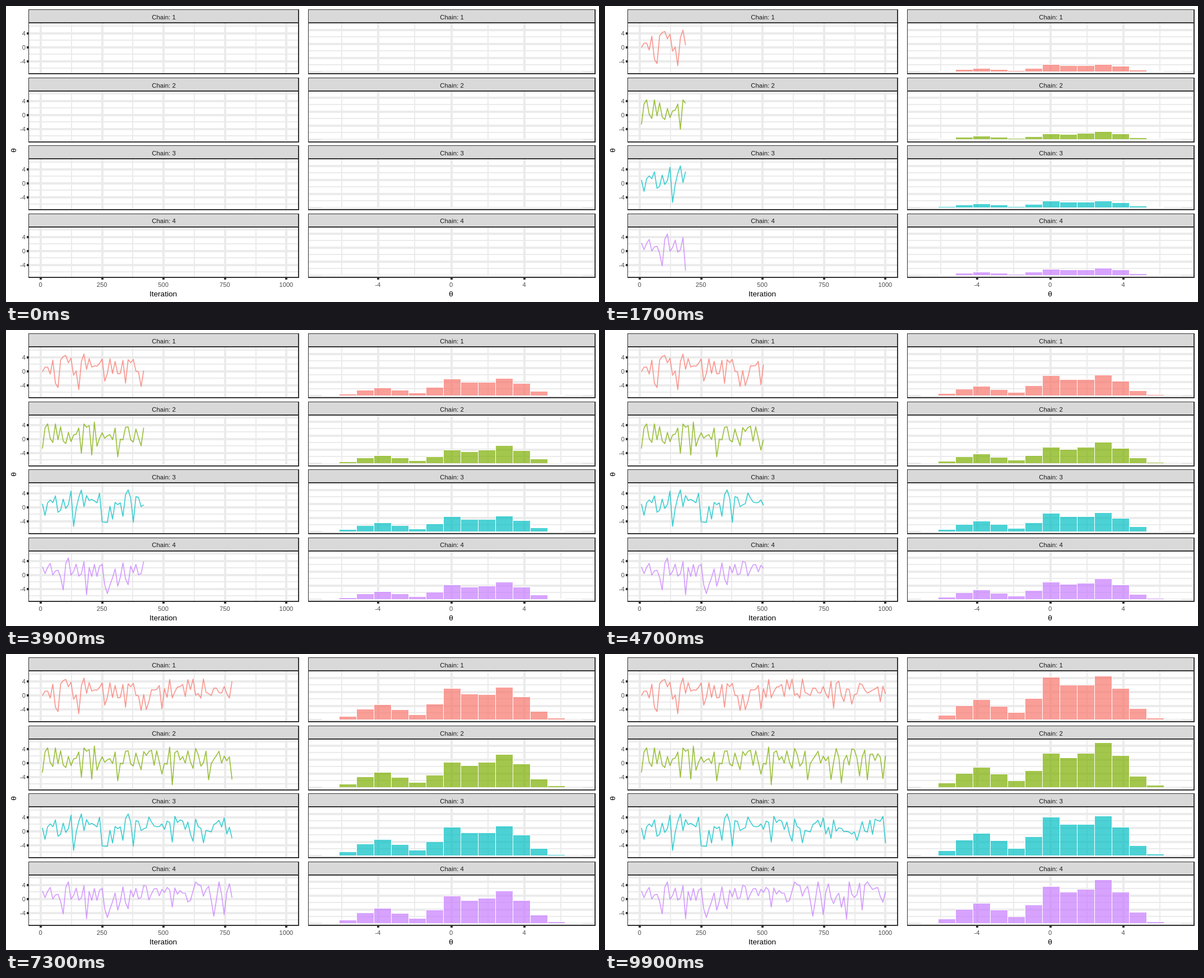
An HTML page with a canvas for the animation above (10 s loop, 1058x529 px).

```html
<!DOCTYPE html>
<html lang="en">
<head>
<meta charset="utf-8">
<title>Trace plots and histograms</title>
<style>
html, body { margin: 0; width: 100%; height: 100%; overflow: hidden; background: #fff; }
canvas { display: block; }
</style>
</head>
<body>
<canvas id="stage" width="1058" height="529"></canvas>
<script>
const ctx = document.getElementById('stage').getContext('2d');
const INK = '#333333', GRID = '#ebebeb', AXIS = '#4d4d4d';
const FRAME_MS = 100, FRAMES = 100, LAST_DRAW = 94;
const ROW = 121.4;                    // vertical distance between panels
const BINS = 15, BIN_WIDTH = 31, BINS_LEFT = 563;
const thetaX = theta => 794.5 + 32.65 * theta;
const iterationX = n => 62 + .4384 * n;

// The sampled distribution: three bell curves, the low one visited in dips
const MODES = [{ mean: -3.8, width: 1.54 }, { mean: .1, width: 1.22 }, { mean: 2.9, width: 1.6 }];

// peaks: final bar height in pixels at each mode; dips: draws that visit the low mode
const chains = [
  { color: '#F8766D', peaks: [36, 73, 78], dips: [5, 6, 14, 24, 32, 38, 40, 46, 74, 78, 81, 92] },
  { color: '#7CAE00', peaks: [36, 58, 80], dips: [0, 15, 19, 21, 29, 38, 46, 50, 64, 73, 77, 84, 87, 93] },
  { color: '#00BFC4', peaks: [40, 66, 71], dips: [1, 12, 23, 24, 25, 27, 31, 35, 50, 58, 62, 83, 94] },
  { color: '#C77CFF', peaks: [36, 63, 78], dips: [8, 17, 24, 25, 26, 29, 33, 50, 66, 70, 77, 79, 85] },
];

function seeded(seed) {
  return () => {
    seed = (Math.imul(seed, 1664525) + 1013904223) >>> 0;
    return seed / 2 ** 32;
  };
}

function sampleTrace(dips, seed) {
  const random = seeded(seed);
  const normal = () => 2 * (random() + random() + random() - 1.5);
  return Array.from({ length: LAST_DRAW + 1 }, (_, i) => {
    const upper = random() < .4 ? 1 : 2;
    const { mean, width } = MODES[dips.includes(i) ? 0 : upper];
    return Math.min(4.9, mean + normal() * width / Math.SQRT2);
  });
}

function barHeight(peaks, bin) {
  const theta = (BINS_LEFT + BIN_WIDTH * (bin + .5) - thetaX(0)) / 32.65;
  return MODES.reduce((sum, { mean, width }, m) =>
    sum + peaks[m] * Math.exp(-(((theta - mean) / width) ** 2)), 0);
}

chains.forEach((chain, i) => {
  chain.top = ROW * i;
  chain.trace = sampleTrace(chain.dips, 7919 * (i + 1));
  chain.bars = Array.from({ length: BINS }, (_, bin) => barHeight(chain.peaks, bin));
});

function box(color, x, y, w, h) {
  ctx.fillStyle = color;
  ctx.fillRect(Math.round(x), Math.round(y), w, h);
}

function label(text, x, y, size, color, align = 'center') {
  ctx.font = size + 'px "Liberation Sans", Arial, sans-serif';
  ctx.fillStyle = color;
  ctx.textAlign = align;
  ctx.fillText(text, x, Math.round(y));
}

// Evenly spaced grid lines inside one panel
function grid(x, w, top, size, firstX, stepX, firstY) {
  for (let gx = firstX; gx < x + w; gx += stepX) box(GRID, gx - size / 2, top + 31, size, 89);
  for (let gy = firstY; gy < 120; gy += 25) box(GRID, x, top + gy - size / 2, w, size);
}

function border(x, w, top, title) {
  box('#d9d9d9', x, top + 6.4, w, 23);
  box(INK, x, top + 6.4, w, 1);
  box(INK, x, top + 6.4, 1, 115);
  box(INK, x, top + 29.3, w, 2);
  box(INK, x, top + 120.2, w, 2);
  box(INK, x + w - 2, top + 6.4, 2, 115);
  label(title, x + w / 2, top + 24.2, 11.4, '#1a1a1a');
}

function drawTrace({ color, trace, top }, step) {
  if (!step) return;
  ctx.globalAlpha = .75;
  ctx.strokeStyle = color;
  ctx.lineWidth = 1.7;
  ctx.lineJoin = 'round';
  ctx.beginPath();
  trace.slice(0, step + 1).forEach((v, i) => ctx.lineTo(65 + 4.633 * i, top + 73.7 - 6.25 * v));
  ctx.stroke();
  ctx.globalAlpha = 1;
}

function drawBars({ color, bars, top }, step) {
  const base = Math.round(top + 117) + .5;
  ctx.strokeStyle = '#fff';
  ctx.lineWidth = 1;
  bars.forEach((full, i) => {
    const h = Math.round(full * step / (FRAMES - 1));
    const x = BINS_LEFT + BIN_WIDTH * i + .5;
    ctx.globalAlpha = .7;
    ctx.fillStyle = color;
    ctx.fillRect(x, base - h, BIN_WIDTH, h);
    ctx.globalAlpha = 1;
    ctx.strokeRect(x, base - h, BIN_WIDTH, h);
  });
}

function tickBelow(text, x) {
  box(INK, x - 2, 486, 4, 3);
  label(text, x - .5, 502, 11.2, AXIS);
}

function drawAxes() {
  for (let n = 0; n <= 1000; n += 250) tickBelow(n, iterationX(n));
  for (let n = -4; n <= 4; n += 4) tickBelow(n, thetaX(n));
  label('Iteration', 280.5, 519, 13.6, '#000');
  label('θ', 794, 519, 13.6, '#000');
  ctx.save();
  ctx.translate(18, 258);
  ctx.rotate(-Math.PI / 2);
  label('θ', 0, 0, 13.6, '#000');
  ctx.restore();
}

function draw(step) {
  box('#fff', 0, 0, 1058, 529);
  chains.forEach((chain, i) => {
    const { top } = chain, title = 'Chain: ' + (i + 1);
    grid(41, 480, top, 2, iterationX(125), 109.6, 36);
    grid(41, 480, top, 4, iterationX(0), 109.6, 49);
    grid(540, 510, top, 2, thetaX(-6), 130.6, 55);
    grid(540, 510, top, 4, thetaX(-4), 130.6, 42.7);
    drawTrace(chain, Math.min(step, LAST_DRAW));
    drawBars(chain, step);
    border(40, 483, top, title);
    border(539, 513, top, title);
    for (let n = -4; n <= 4; n += 4) {
      const y = top + 74 - 6.25 * n;
      box(INK, 37, y - 2, 4, 4);
      label(n, 35, y + 4, 11.2, AXIS, 'right');
    }
  });
  drawAxes();
}

function tick() {
  draw(Math.floor(performance.now() / FRAME_MS) % FRAMES);
  requestAnimationFrame(tick);
}
tick();
</script>
</body>
</html>
```
